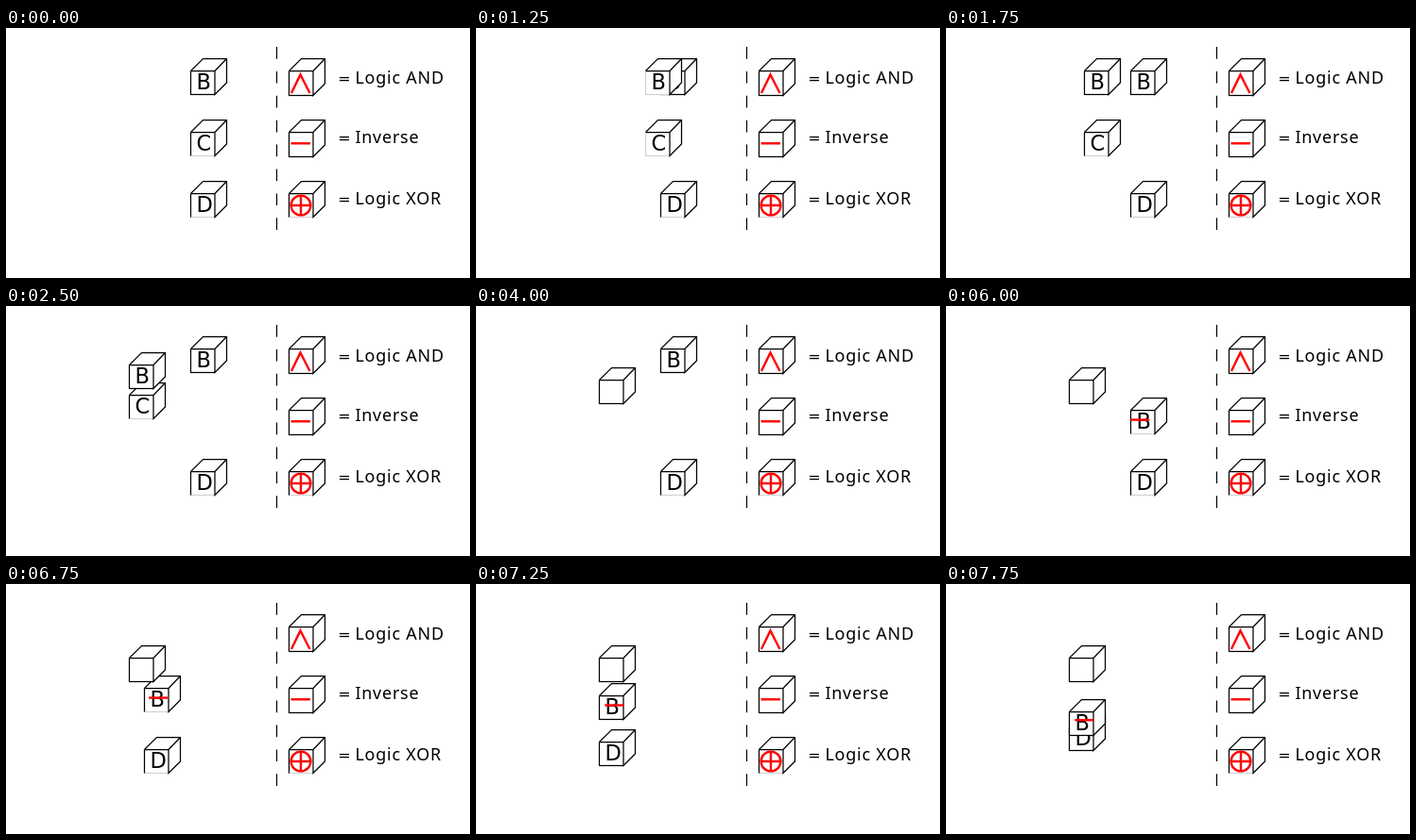
An HTML page that plays this animation: 491x265 px, repeating every 8000 ms.

```html
<!DOCTYPE html>
<html lang="en">
<head>
<meta charset="utf-8">
<title>Logic cubes</title>
<style>
  html, body { margin: 0; width: 100%; height: 100%; overflow: hidden; background: #fff; }
  svg { display: block; width: 491px; height: 265px; }
  .edge { fill: none; stroke: #000; stroke-width: 1.25; }
  .faint { stroke: #d4d4d4; }
  .mark { fill: none; stroke: #f00; stroke-width: 2.4; }
  .label { font: 18px "Noto Sans", sans-serif; letter-spacing: .75px; }
  .equals { font: 16px "DejaVu Sans", sans-serif; }
  .letter { font: 22.5px "DejaVu Sans", sans-serif; }
</style>
</head>
<body>
<svg viewBox="0 0 491 265">
  <path d="M286.5 20V214" stroke="#000" stroke-width="1.2" stroke-dasharray="12.7 13.2"/>
  <g id="legend"></g>
  <g id="scene"></g>
</svg>
<script>
const LOOP = 8000, STEP = 250;
const legend = document.getElementById('legend');
const scene = document.getElementById('scene');

const path = (cls, d) => `<path class="${cls}" d="${d}"/>`;

function cube(x, y, inner = '', { base = 38.5, faintBase = false, faintLeft = false } = {}) {
  const side = base - 12.5;
  return `<g transform="translate(${x} ${y})">` +
    `<path fill="#fff" d="M.5 13.5L13.5 .5H38.5V${side}L26 ${base}H.5Z"/>` +
    path('edge' + (faintBase ? ' faint' : ''), `M0 ${base}H26`) +
    path('edge' + (faintLeft ? ' faint' : ''), `M.5 13.5V${base}`) +
    path('edge', `M.5 13.5L13.5 .5H38.5V${side}L26 ${base}V13.5H.5M26 13.5L38.5 .5`) +
    inner + '</g>';
}

function letterCube(ch, x, y) {
  const text = `<text class="letter" x="6.4" y="33.2">${ch}</text>`;
  return cube(x, y, text, {
    faintBase: x === 179 || [81, 97, 162].includes(y),
    faintLeft: x === 179
  });
}

const wedge = path('mark', 'M3 37L12.5 17.5L22.5 37');
const bar = path('mark', 'M2.5 25.3H23');
const xor = '<circle class="mark" cx="13" cy="26" r="10.4"/>' + path('mark', 'M13 16V36M3 26H23');

function entry(y, mark, name, baseline, opts) {
  return cube(299, y, mark, opts) +
    `<text class="equals" x="351.3" y="${baseline}">=</text>` +
    `<text class="label" x="369.4" y="${baseline}">${name}</text>`;
}

legend.innerHTML =
  entry(32, wedge, 'Logic AND', 59, { base: 39.5 }) +
  entry(97, bar, 'Inverse', 122, { base: 39.5 }) +
  entry(162, xor, 'Logic XOR', 187, { faintBase: true });

// Whole steps taken since a start time, limited to 0..4
const steps = (t, start) => Math.max(0, Math.min(4, Math.floor((t - start) / STEP) + 1));
const slideX = k => Math.round(194.9 - 16.25 * k);

function draw(t) {
  const out = [];
  const down = steps(t, 5250), left = steps(t, 6250), join = steps(t, 7250);

  out.push(letterCube('D', slideX(left), Math.round(162.2 - 8.125 * join)));

  const by = join ? Math.round(97.2 + 8.125 * join) : Math.round(32.3 + 16.25 * down);
  out.push(letterCube('B', slideX(left), by));
  if (down === 4) {
    const x = 195.3 - 14.75 * left, y = 120.6 + 7.9 * join;
    out.push(path('mark', `M${x} ${y}h20`));
  }

  if (t < 3000) {
    const k = steps(t, 1250), m = steps(t, 2250);
    out.push(letterCube('C', slideX(k), Math.round(97.3 - 8.125 * m)));
    if (k) out.push(letterCube('B', slideX(k), Math.round(32.3 + 8.125 * m)));
  } else {
    out.push(cube(130, 65, t < 4000 ? wedge : ''));
  }
  scene.innerHTML = out.join('');
}

let shown = -1;
function tick() {
  const slot = Math.floor(performance.now() % LOOP / STEP);
  if (slot !== shown) draw((shown = slot) * STEP);
  requestAnimationFrame(tick);
}
tick();
</script>
</body>
</html>
```
